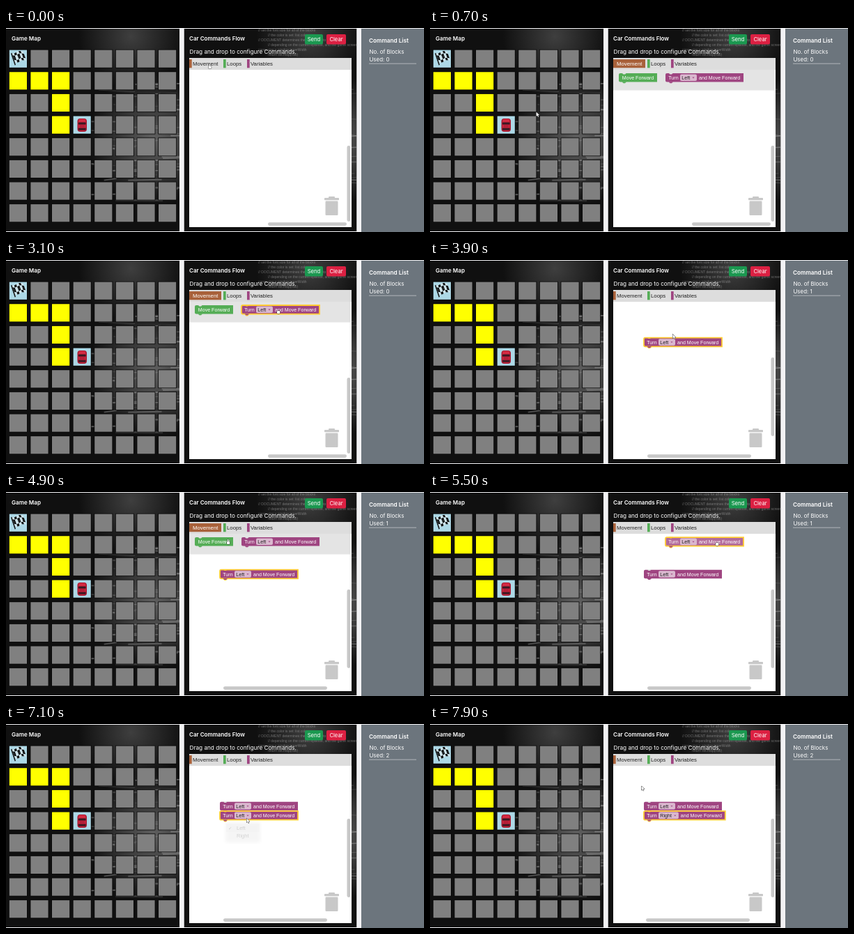
An HTML page with a canvas for the animation above (8000 ms loop, 600 by 293 pixels).

```html
<!DOCTYPE html>
<html lang="en">
<head>
<meta charset="utf-8">
<title>Car command blocks</title>
<style>
html, body { margin: 0; width: 100%; height: 100%; overflow: hidden; background: #fff; }
canvas { display: block; width: 600px; height: 293px; }
</style>
</head>
<body>
<canvas id="stage" width="600" height="293"></canvas>
<script>
const LOOP = 8000, STEP = 100;
const UI = 'Inter, "Open Sans", sans-serif', SANS = '"Liberation Sans", Arial, sans-serif';
const PURPLE = '#9f4581', GREEN = '#55ad56', BROWN = '#a8613a', GREY = '#c8c8c8';

// Moments at which the interface changes.
const OPEN_1 = 300, PRESS_1 = 3000, DRAG_1 = 3200, DROP_1 = 3700;
const OPEN_2 = 4300, PRESS_2 = 5400, DRAG_2 = 5500, DROP_2 = 6400;
const MENU = 7060, PICK = 7600;

// Cursor stops: arrival time, x, y, pause.
const TAB = [291.5, 51.5];
const stops = [
  [0, ...TAB, OPEN_1], [900, 104, 145, 300], [1600, 80.5, 79, 0], [2000, 17, 75, 0],
  [2200, 12, 46, 0], [2800, 390, 70, 400], [3600, 359, 116.7, 200], [4200, ...TAB, 300],
  [4900, 318, 68, 0], [5300, 411, 70, 200], [5900, 381, 144, 200], [6300, 380, 130, 200],
  [6900, 345.5, 135.5, 300], [7400, 340, 159, 200], [7900, 303.5, 89, 0]
];

const stage = document.getElementById('stage');
let c = stage.getContext('2d');

function rect(x, y, w, h, fill, r = 0) {
  c.fillStyle = fill;
  c.beginPath();
  c.roundRect(x, y, w, h, r);
  c.fill();
}

function text(s, x, y, size, fill, font = UI, weight = 400, align = 'left') {
  c.font = `${weight} ${size}px ${font}`;
  c.fillStyle = fill;
  c.textAlign = align;
  c.fillText(s, x, y);
}

function poly(points, fill) {
  c.beginPath();
  for (const p of points) c.lineTo(...p);
  c.closePath();
  c.fillStyle = fill;
  c.fill();
}

function glow(x, y, r, alpha) {
  const g = c.createRadialGradient(x, y, 0, x, y, r);
  g.addColorStop(0, `rgba(150,150,150,${alpha})`);
  g.addColorStop(1, 'rgba(150,150,150,0)');
  rect(x - r, y - r, 2 * r, 2 * r, g);
}

function darkPhoto(x, w, seed) {
  const rand = () => (seed = (seed * 16807) % 2147483647) / 2147483647;
  c.save();
  c.beginPath();
  c.rect(x, 1, w, 291);
  c.clip();
  rect(x, 0, w, 293, '#101010');
  glow(x + w * 0.85, 160, 95, 0.6);
  glow(x + w * 0.72, 12, 75, 0.35);
  for (let i = 0; i < 45; i++) {
    const sx = x + w * (0.45 + rand() * 0.5), sy = 75 + rand() * 175;
    c.strokeStyle = `rgba(190,190,190,${0.1 + rand() * 0.35})`;
    c.lineWidth = 0.5 + rand() * 2;
    c.beginPath();
    c.moveTo(sx, sy);
    c.lineTo(sx + 15 + rand() * 60, sy + (rand() - 0.5) * 6);
    c.stroke();
  }
  c.restore();
}

function codeLines() {
  const lines = ['// set the font size for all of the blocks', '// the color is set: list.color',
    '// DOCUMENT determines the div screen to be used', '// depending on the current episode, and the game screen',
    'const size = window.innerWidth', 'return list.map(row)'];
  lines.forEach((s, i) => text(s, 362 + i % 2 * 14, 5 + i * 7, 5, 'rgba(190,190,190,.5)', SANS));
}

function flag() {
  poly([[7, 36.5], [8.6, 35.8], [14, 53], [12.6, 53.5]], '#111');
  const at = (u, v) => [8.5 + u * 3.2 + v * 1.2, 36.2 - u * 0.7 + v * 3.3 + Math.sin(u * 1.5)];
  for (let u = 0; u < 5; u++) for (let v = 0; v < 4; v++) {
    const edge = v === 0 || v === 3;
    poly([at(u, v), at(u + 1, v), at(u + 1, v + 1), at(u, v + 1)], edge !== (u % 2 === 0) ? '#111' : '#cfe3ea');
  }
}

function car() {
  rect(102.5, 130, 13.5, 19, '#a5182f', 4);
  rect(104, 130.8, 10.5, 17, '#d42a42', 3);
  for (const y of [135.5, 143.5]) rect(104, y, 10.5, 3.2, '#3a1822', 1);
  rect(105.2, 138.7, 8, 4.8, '#b51f38', 1);
}

function map() {
  text('Game Map', 8, 17.6, 8.1, '#fff', UI, 600);
  for (let row = 0; row < 8; row++) for (let col = 0; col < 8; col++) {
    const x = 4.8 + col * 30.6, y = 31.6 + row * 31.65;
    const road = row === 1 && col < 3 || col === 2 && (row === 2 || row === 3);
    const end = row + col === 0 || row === 3 && col === 3;
    rect(x - 0.8, y - 0.8, 26.8, 26.8, '#080808');
    rect(x, y, 25.2, 25.2, road ? '#ff0' : end ? '#add8e6' : '#808080');
  }
  flag();
  car();
}

function button(label, x, w, fill) {
  rect(x, 9, w, 14.5, fill, 2);
  text(label, x + w / 2, 19, 7.7, '#fff', UI, 400, 'center');
}

function trash() {
  rect(463, 242, 9, 3, GREY, 1);
  rect(457, 244, 21, 3.2, GREY, 0.8);
  rect(458.5, 248.5, 18, 20.5, GREY, 1.2);
}

function drawFixed() {
  rect(0, 0, 600, 293, '#f2f2f4');
  darkPhoto(0, 249, 71);
  darkPhoto(255.5, 248, 913);
  codeLines();
  rect(510, 1, 90, 292, '#6c757d');
  map();
  text('Car Commands Flow', 263, 17.8, 8, '#fff', UI, 600);
  text('Drag and drop to configure Commands.', 263.5, 36.6, 8.2, '#fff');
  button('Send', 429, 26, '#1b9850');
  button('Clear', 460, 28, '#dc2042');
  rect(263, 43, 233, 243, '#fff');
  rect(263, 43, 233, 17, '#ddd');
  trash();
  text('Command List', 521, 21, 8.2, '#fff', UI, 600);
  text('No. of Blocks', 521.5, 36.5, 7.9, '#fff');
  rect(521, 50.8, 68, 0.8, '#c6cacd');
}

function shell(x, y, w, fill, selected, alpha = 1) {
  const h = 12.6;
  c.beginPath();
  c.roundRect(x, y, w, h, [2, 0, 0, 2]);
  c.globalAlpha = alpha;
  c.fillStyle = fill;
  c.fill();
  c.globalAlpha = 1;
  if (selected) {
    c.lineWidth = 1.8;
    c.strokeStyle = '#fc3';
    c.stroke();
  }
  const tooth = (top, color) => poly([[x + 4.5, top], [x + 11, top], [x + 9, top + 2], [x + 6.5, top + 2]], color);
  tooth(y - 0.6, selected ? '#fc3' : '#e4e4e4');
  if (selected) tooth(y + h + 0.8, '#fc3');
  tooth(y + h - 0.3, fill);
}

function forwardBlock(x, y) {
  shell(x, y, 55, GREEN);
  text('Move Forward', x + 4.8, y + 8.9, 7.1, '#fff', SANS);
}

function turnBlock([x, y], { dir = 'Left', selected = false, alpha = 1 } = {}) {
  const extra = dir === 'Right' ? 4.8 : 0, arrow = x + 40 + extra;
  shell(x, y, 112 + extra, PURPLE, selected, alpha);
  text('Turn', x + 4.3, y + 8.9, 7.1, '#fff', SANS);
  rect(x + 21, y + 1.5, 24 + extra, 9.6, '#dab8cf', 2);
  text(dir, x + 23.3, y + 8.9, 7.1, '#222', SANS);
  poly([[arrow - 1.5, y + 5.6], [arrow + 1.5, y + 5.6], [arrow, y + 7.4]], PURPLE);
  text('and Move Forward', x + 48 + extra, y + 8.9, 7.1, '#fff', SANS);
}

function toolbox(open) {
  if (open) rect(263, 60, 232, 29.5, '#e4e4e4');
  const tab = (label, x, color, on) => {
    rect(x, 45, on ? 46 : 3.7, 12.3, color);
    text(label, x + 5, 54, 7.8, on ? '#fff' : '#222', SANS);
  };
  tab('Movement', 263, BROWN, open);
  tab('Loops', 312, GREEN);
  tab('Variables', 346, PURPLE);
}

function scrollbars(t) {
  const top = t < DROP_1 ? 169 : t < DROP_2 ? 140 : 136;
  const left = t < DROP_1 ? 376 : t < PICK ? 312 : 310;
  rect(489.5, top, 4.8, t < DROP_1 ? 109 : 113, GREY, 2.4);
  rect(left, 279.2, t < DROP_1 ? 113 : 149, 4.8, GREY, 2.4);
}

function menu(alpha) {
  if (alpha <= 0) return;
  c.globalAlpha = alpha;
  c.shadowColor = 'rgba(0,0,0,.3)';
  c.shadowBlur = 4;
  rect(315, 141.5, 50, 28.5, '#fff', 2);
  c.shadowColor = 'transparent';
  rect(316, 143, 48, 12, '#e4e4e4');
  text('✓', 319, 151.5, 6.5, '#222', '"DejaVu Sans", sans-serif');
  text('Left', 331, 151.6, 7.5, '#222', SANS);
  text('Right', 331, 163, 7.5, '#222', SANS);
  c.globalAlpha = 1;
}

function cursorAt(t) {
  const next = stops.findIndex(s => s[0] > t);
  if (next < 0) return stops[stops.length - 1].slice(1, 3);
  const [t0, x0, y0, pause] = stops[next - 1], [t1, x1, y1] = stops[next];
  const u = Math.max(0, (t - t0 - pause) / (t1 - t0 - pause)), e = u * u * (3 - 2 * u);
  return [x0 + (x1 - x0) * e, y0 + (y1 - y0) * e];
}

// A dragged block keeps its distance from the cursor.
function dragged(t, start, end, dx, dy) {
  const [x, y] = cursorAt(Math.max(start, Math.min(t, end)));
  return [x - dx, y - dy];
}

function cursor(t) {
  const [x, y] = cursorAt(t);
  const within = (a, b) => t >= a && t < b;
  c.save();
  c.translate(x, y);
  c.beginPath();
  if (within(0, 400) || within(2700, 3900) || within(4100, 6600)) {
    const grip = within(PRESS_1, DROP_1) || within(PRESS_2, DROP_2);
    if (!grip) c.roundRect(0, 0, 1.3, 4, 0.6);
    c.roundRect(-1, 3, 4.2, 4, 1.2);
  } else {
    for (const p of [[0, 0], [0, 6], [1.4, 4.8], [2.5, 7], [3.4, 6.5], [2.4, 4.4], [4.3, 4.3]]) c.lineTo(...p);
    c.closePath();
  }
  c.lineWidth = 1;
  c.strokeStyle = '#333';
  c.stroke();
  c.fillStyle = '#fff';
  c.fill();
  c.restore();
}

const fixed = document.createElement('canvas'), screen = c;
fixed.width = 600;
fixed.height = 293;
c = fixed.getContext('2d');
drawFixed();
c = screen;

function draw(t) {
  const open = (t >= OPEN_1 && t < DRAG_1) || (t >= OPEN_2 && t < DRAG_2);
  c.drawImage(fixed, 0, 0);
  scrollbars(t);
  toolbox(open);
  if (open) {
    forwardBlock(271, 65);
    turnBlock([338, 65], { selected: (t >= PRESS_1 && t < DRAG_1) || t >= PRESS_2 });
  }
  if (t >= DRAG_1)
    turnBlock(dragged(t, DRAG_1, 3600, 52, 5), { selected: t < PRESS_2, alpha: t < DROP_1 ? 0.8 : 1 });
  if (t >= DRAG_2)
    turnBlock(dragged(t, DRAG_2, 6300, 73, 4.9), { dir: t < PICK ? 'Left' : 'Right', selected: true, alpha: t < DROP_2 ? 0.8 : 1 });
  menu(t < PICK ? Math.min(1, (t - MENU) / 250) : 1 - (t - PICK + STEP) / 250);
  text('Used: ' + ((t > DRAG_1) + (t > DRAG_2)), 521.5, 47.5, 7.9, '#fff');
  cursor(t);
}

function tick() {
  draw(Math.floor(performance.now() % LOOP / STEP) * STEP);
  requestAnimationFrame(tick);
}
tick();
</script>
</body>
</html>
```
